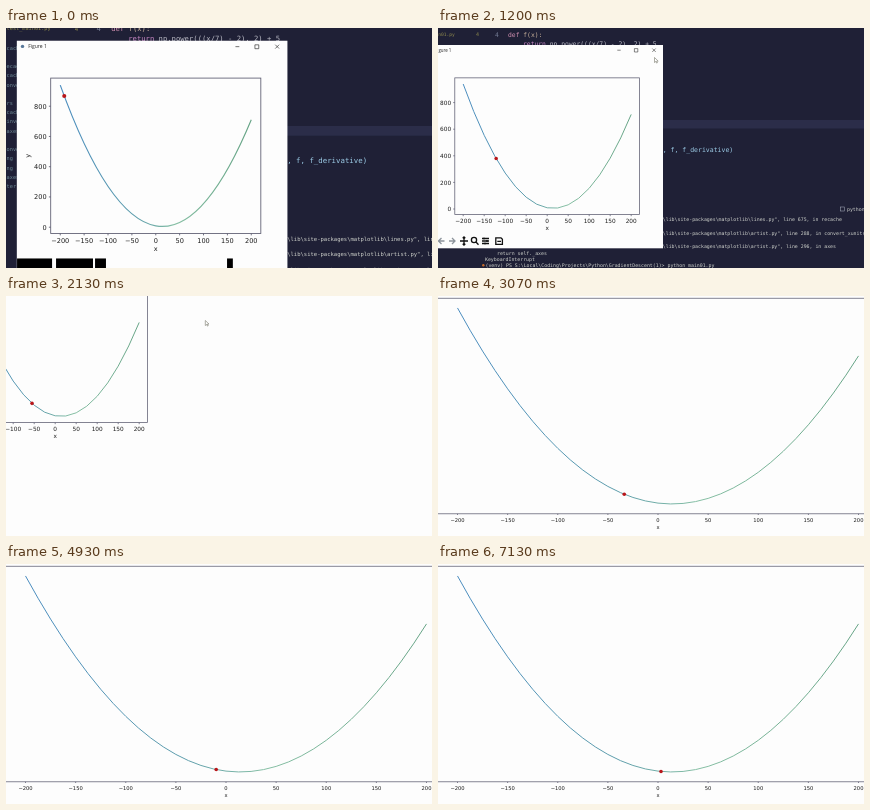
These frames come from a looping animation (426 by 240 pixels, 7190 ms). An HTML page:

```html
<!DOCTYPE html>
<html lang="en">
<head>
<meta charset="utf-8">
<title>Gradient descent</title>
<style>
  html, body { margin: 0; width: 100%; height: 100%; overflow: hidden; background: #fdfdfd; }
  svg { display: block; width: 100vw; height: 100vh; }
  text { white-space: pre; }
  .mono { font-family: "DejaVu Sans Mono", monospace; }
  .plot { font-family: "DejaVu Sans", sans-serif; fill: #1c1c1c; }
  .ui { font-family: "Open Sans", sans-serif; fill: #222; }
  .axis { fill: none; stroke: #5c5c70; stroke-width: .75; }
  .icon { fill: none; stroke: #111; stroke-width: 1.3; }
  .off { fill: none; stroke: #8d949c; stroke-width: 1.3; }
  .thin { fill: none; stroke: #333; stroke-width: .6; }
</style>
</head>
<body>
<svg viewBox="0 0 426 240">
  <defs>
    <linearGradient id="ink" gradientUnits="userSpaceOnUse">
      <stop offset="0" stop-color="#4a8cbf"/>
      <stop offset=".4" stop-color="#5d9dab"/>
      <stop offset=".6" stop-color="#86bfa4"/>
      <stop offset="1" stop-color="#65a385"/>
    </linearGradient>
  </defs>
  <rect width="426" height="240" fill="#fdfdfd"/>
  <g id="camera">
    <g id="editor"></g>
    <g id="figure">
      <g id="chrome"></g>
      <g id="small"></g>
    </g>
  </g>
  <g id="large"></g>
  <path id="cursor" d="M0 0V5L1.3 3.9L2.1 5.6L2.9 5.2L2.1 3.6H3.7Z" fill="#fff" stroke="#77776a" stroke-width=".6"/>
</svg>
<script>
const LOOP = 7190, STEP = 200 / 3;
const MAXIMISE = 2000, RELAYOUT = 2190, CURSOR_IN = 900, CURSOR_OUT = 2600;
const MINIMUM = 14;
const raw = String.raw;
const el = id => document.getElementById(id);
const show = (id, on) => el(id).setAttribute("visibility", on ? "inherit" : "hidden");
const move = (id, x, y, s = 1) => el(id).setAttribute("transform", `translate(${x} ${y}) scale(${s})`);

const f = x => (x / 7 - 2) ** 2 + 5;
const slope = x => 2 * (x / 7 - 2) / 7;
const range = (from, to, step) =>
  Array.from({ length: Math.round((to - from) / step) + 1 }, (_, i) => from + i * step);
const esc = s => s.replace(/&/g, "&amp;").replace(/</g, "&lt;").replace(/>/g, "&gt;");
const label = (x, y, size, s, extra = "") =>
  `<text x="${x}" y="${y}" font-size="${size}" ${extra}>${esc(s)}</text>`;
const rect = (x, y, w, h, extra = "") =>
  `<rect x="${x}" y="${y}" width="${w}" height="${h}" ${extra}/>`;
const path = (d, cls) => `<path d="${d}" class="${cls}"/>`;

// Origin and pixels per unit of the axes in both window sizes
const views = {
  small: { x0: 109.2, y0: 181, kx: .42, ky: .133, font: 5.8, tick: 1.6 },
  large: { x0: 220, y0: 209, kx: 1.0025, ky: .2097, font: 5.2, tick: 1.2 }
};

function drawPlot(id) {
  const { x0, y0, kx, ky, font, tick } = views[id];
  const X = x => x0 + kx * x, Y = y => y0 - ky * y;
  const left = X(-220), bottom = Y(-42), top = Y(986);
  const minus = n => String(n).replace("-", "\u2212");
  const xTicks = range(-200, 200, 50).map(n =>
    path(`M${X(n)} ${bottom}v${tick}`, "axis") +
    label(X(n), bottom + 8.1, font, minus(n), 'text-anchor="middle"')).join("");
  const yTicks = range(0, 800, 200).map(n =>
    path(`M${left} ${Y(n)}h${-tick}`, "axis") +
    label(left - 3.6, Y(n) + 2.1, font, String(n), 'text-anchor="end"')).join("");
  const tip = Y(f(-200) + 200 * slope(-200));
  const curve = `M${X(-200)} ${Y(f(-200))}Q${X(0)} ${tip} ${X(200)} ${Y(f(200))}`;
  const grad = el("ink").cloneNode(true);
  grad.id = "ink-" + id;
  grad.setAttribute("x1", X(-200));
  grad.setAttribute("x2", X(200));
  el("ink").parentNode.append(grad);
  el(id).innerHTML = `<g class="plot">${xTicks}${yTicks}` +
    label(X(0), bottom + 15.2, font, "x", 'text-anchor="middle"') +
    label(0, 0, font, "y", `text-anchor="middle" transform="translate(${left - 18.5} ${Y(472)}) rotate(-90)"`) +
    `</g>` + rect(left, top, 440 * kx, bottom - top, 'class="axis"') +
    `<path d="${curve}" fill="none" stroke="url(#ink-${id})" stroke-width="1"/>` +
    `<circle id="dot-${id}" r="1.8" fill="#b8161a"/>`;
}

function drawChrome() {
  const icons = [
    "M22 213H30M26 209V217M24.7 210.3L26 209L27.3 210.3M24.7 215.7L26 217L27.3 215.7",
    "M38.6 212a2.6 2.6 0 1 1-5.2 0a2.6 2.6 0 1 1 5.2 0M38 214L40.5 216.8",
    "M44 210.5H51M44 213H51M44 215.5H51M46 209.5v2M49 212v2M47 214.5v2",
    "M57.8 209.8H63L64.4 211.2V216.4H57.8ZM59.3 213.3H63"
  ];
  const arrows = "M6.5 213H.5M3.5 210L.5 213L3.5 216M11 213H17M14 210L17 213L14 216";
  const blocks = [[-12.8, 30.8], [21.5, 32.5], [55.8, 9.6], [171.9, 5.1]];
  el("chrome").innerHTML =
    rect(-13, 17, 238, 203.3, 'fill="#fdfdfd"') +
    '<circle cx="-8" cy="22" r="1.5" fill="#58789a"/>' +
    label(-3, 23.8, 4.4, "Figure 1", 'class="ui"') +
    path("M179.3 22.2h3.4", "thin") + path("M196.4 20.6h3.4v3.4h-3.4z", "thin") +
    path("M214.3 20.5l3.4 3.4M217.7 20.5l-3.4 3.4", "thin") +
    `<g id="icons">${icons.map(d => path(d, "icon")).join("")}${path(arrows, "off")}</g>` +
    `<g id="blocks">${blocks.map(([x, w]) => rect(x, 208.5, w, 10, 'fill="#000"')).join("")}</g>`;
}

function drawEditor() {
  const code = (x, y, s, fill, size = 6.35) => label(x, y, size, s, `fill="${fill}"`);
  const term = (x, y, s, fill = "#cfd2cc") => label(x, y, 4.88, s, `fill="${fill}"`);
  const lib = raw`\lib\site-packages\matplotlib` + "\\";
  const side = ["cach", "", "ecach", "cach", "onver", "", "rs", "cach", "inve", "axes",
    "", "onver", "ng", "ng", "axes", "ter"];
  el("editor").innerHTML = '<g class="mono">' +
    rect(-80, -50, 600, 340, 'fill="#1f2036"') +
    rect(40, 92, 480, 8.5, 'fill="#2b2d49"') +
    side.map((s, i) => label(-22, 25 + i * 8.1, 4.6, s, 'fill="#6f8a96"')).join("") +
    label(-22, 7.8, 4.6, "test_main01.py", 'fill="#8f8a4e"') +
    code(38, 8.3, "4", "#8f8a4e", 5) + code(57, 8.6, "4", "#747b94") +
    code(70, 8.6, "def", "#d08fb0") + code(85.3, 8.6, "f(x):", "#c9b29c") +
    code(85, 17.5, "return", "#c787c4") +
    code(111.7, 17.5, "np.power(((x/7) - 2), 2) + 5", "#b9b9c4") +
    code(224.8, 124.2, ", f, f_derivative)", "#9ccbe6", 6.5) +
    rect(402.5, 179, 4, 4, 'fill="none" stroke="#aeb4c2" stroke-width=".5"') +
    term(409, 182.8, "python") +
    term(224.8, 192.8, lib + 'lines.py", line 675, in recache') +
    term(224.8, 206.5, lib + 'artist.py", line 288, in convert_xunits') +
    term(224.8, 220.3, lib + 'artist.py", line 296, in axes') +
    term(59, 226.7, "return self._axes") +
    term(47, 232.7, "KeyboardInterrupt") +
    '<circle cx="45.3" cy="237.2" r="1.2" fill="#c46a2c"/>' +
    term(47.5, 238.8, raw`(venv) PS S:\Local\Coding\Projects\Python\GradientDescent(1)> python main01.py`) +
    "</g>";
}

const ease = p => p * p * (3 - 2 * p);

// Interpolates rows of [time, ...values]
function track(rows, t, curve = p => p) {
  if (t <= rows[0][0]) return rows[0].slice(1);
  const i = rows.findIndex(r => r[0] > t);
  if (i < 0) return rows.at(-1).slice(1);
  const a = rows[i - 1], b = rows[i], p = curve((t - a[0]) / (b[0] - a[0]));
  return a.slice(1).map((v, j) => v + (b[j + 1] - v) * p);
}

// The distance to the minimum decays exponentially
const descent = [[0, -191.6], [1200, -121.5], [2130, -55.3], [4000, -18.8],
  [4930, -9.8], [6400, -.5], [7130, 3]].map(([t, x]) => [t, Math.log(MINIMUM - x)]);
const camera = [[0, 25.6, -6.6, 1.137], [1000, 0, 0, 1]];
const pointer = [[900, 226, 42], [1150, 216.5, 29.5], [1300, 216.5, 29.5], [1750, 199.3, 24.5]];

function draw(t) {
  const maximised = t >= MAXIMISE, large = t >= RELAYOUT;
  move("camera", ...track(camera, t, ease));
  const shift = maximised ? -60 : 0;
  move("figure", shift, shift);
  show("editor", !maximised);
  show("chrome", !maximised);
  show("icons", t >= 200);
  show("blocks", t < 200);
  show("small", !large);
  show("large", large);
  const x = MINIMUM - Math.exp(track(descent, t)[0]);
  const id = large ? "large" : "small", v = views[id];
  move("dot-" + id, v.x0 + v.kx * x, v.y0 - v.ky * f(x));
  show("cursor", t >= CURSOR_IN && t < CURSOR_OUT);
  move("cursor", ...track(pointer, t, ease));
}

drawEditor();
drawChrome();
drawPlot("small");
drawPlot("large");

const start = performance.now();
function tick() {
  const t = (performance.now() - start) % LOOP;
  draw(Math.floor((t + 4) / STEP) * STEP);
  requestAnimationFrame(tick);
}
tick();
</script>
</body>
</html>
```
